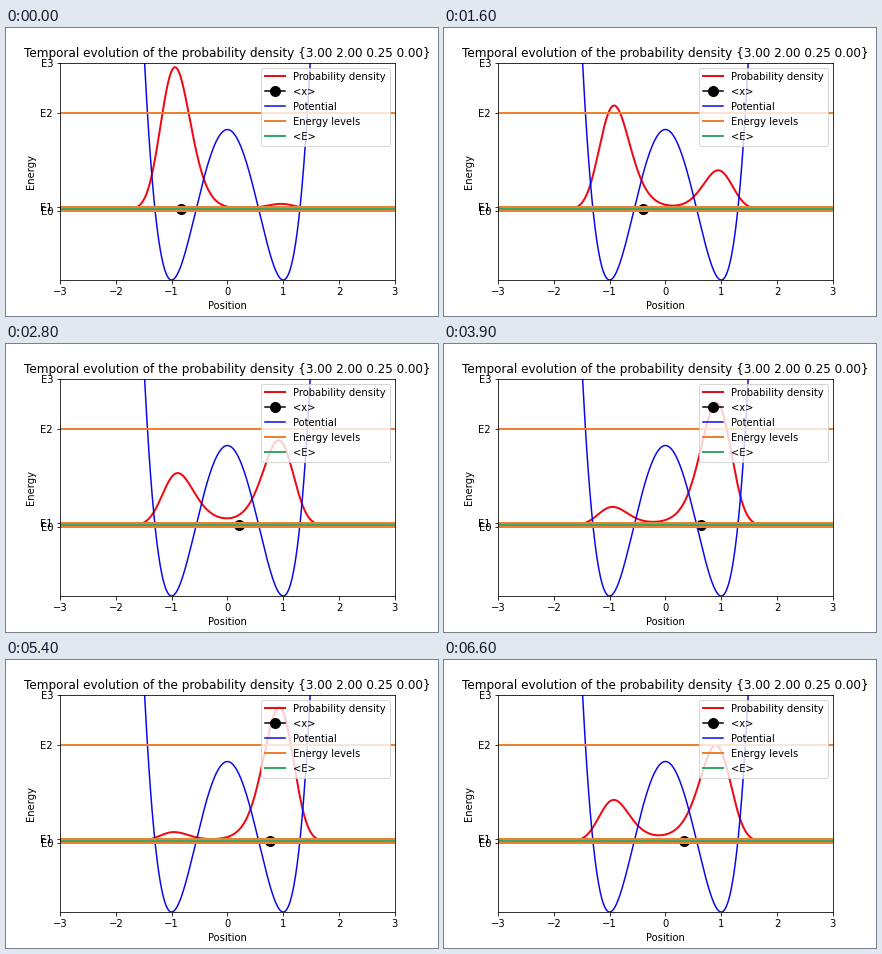
These frames come from a looping animation (432x288 px, 6700 ms). A matplotlib script:

```python
import numpy as np
import matplotlib.pyplot as plt
from matplotlib.animation import FuncAnimation

FRAMES, STEP_MS = 67, 100
KINETIC = 0.0656            # hbar^2 / 2m, in units of the barrier height
TOP = 1.445                 # upper end of the energy axis
PEAK = 0.944                # height of the first density peak
PHASE = np.array([0, 0.0644, 1.4904])   # phase step of each level
COEFFS = (3, 2, 0.25, 0)
ORANGE, GREEN = "#f08030", "#36a966"

# Lowest states of the double well by finite differences
x = np.linspace(-3, 3, 601)
h = x[1] - x[0]
V = (x**2 - 1)**2
hop = np.full(x.size - 1, -KINETIC / h**2)
H = np.diag(V + 2 * KINETIC / h**2) + np.diag(hop, 1) + np.diag(hop, -1)
energies, states = np.linalg.eigh(H)
E = energies[:3]
psi = states[:, :3].T / np.sqrt(h)
psi *= np.sign(psi[:, x < -1.3].sum(axis=1))[:, None]

c = np.array(COEFFS[:3]) / np.linalg.norm(COEFFS)
mean_E = c**2 @ E


def density(i):
    return np.abs((c * np.exp(-1j * PHASE * i)) @ psi)**2


scale = PEAK / density(0).max()

plt.rcParams.update({"font.family": "DejaVu Sans", "font.size": 10})
fig, ax = plt.subplots(figsize=(6, 4), dpi=72)
fig.subplots_adjust(left=0.125, right=0.9, bottom=0.125, top=0.88)

prob, = ax.plot([], [], color="#ee0a14", lw=2, label="Probability density")
mean_x, = ax.plot([], [], "ko-", ms=10, label="<x>")
ax.plot(x, V, color="#0808e8", lw=1.5, label="Potential")
for k, level in enumerate(E):
    ax.plot([-3, 3], [level] * 2, color=ORANGE, lw=2,
            label="Energy levels" if k == 0 else None)
ax.plot([-3, 3], [mean_E] * 2, color=GREEN, lw=2, label="<E>")

ax.set(xlim=(-3, 3), ylim=(0, TOP), xlabel="Position", ylabel="Energy")
ax.set_yticks([*E, TOP], ["E0", "E1", "E2", "E3"])
ax.set_title("Temporal evolution of the probability density "
             "{%.2f %.2f %.2f %.2f}" % COEFFS, fontsize=12)
ax.legend(loc="upper right")


def draw(i):
    rho = density(i)
    prob.set_data(x, mean_E + scale * rho)
    mean_x.set_data([np.sum(x * rho) * h], [mean_E])
    return prob, mean_x


anim = FuncAnimation(fig, draw, frames=FRAMES, interval=STEP_MS,
                     repeat=True, repeat_delay=0)
plt.show()
```
